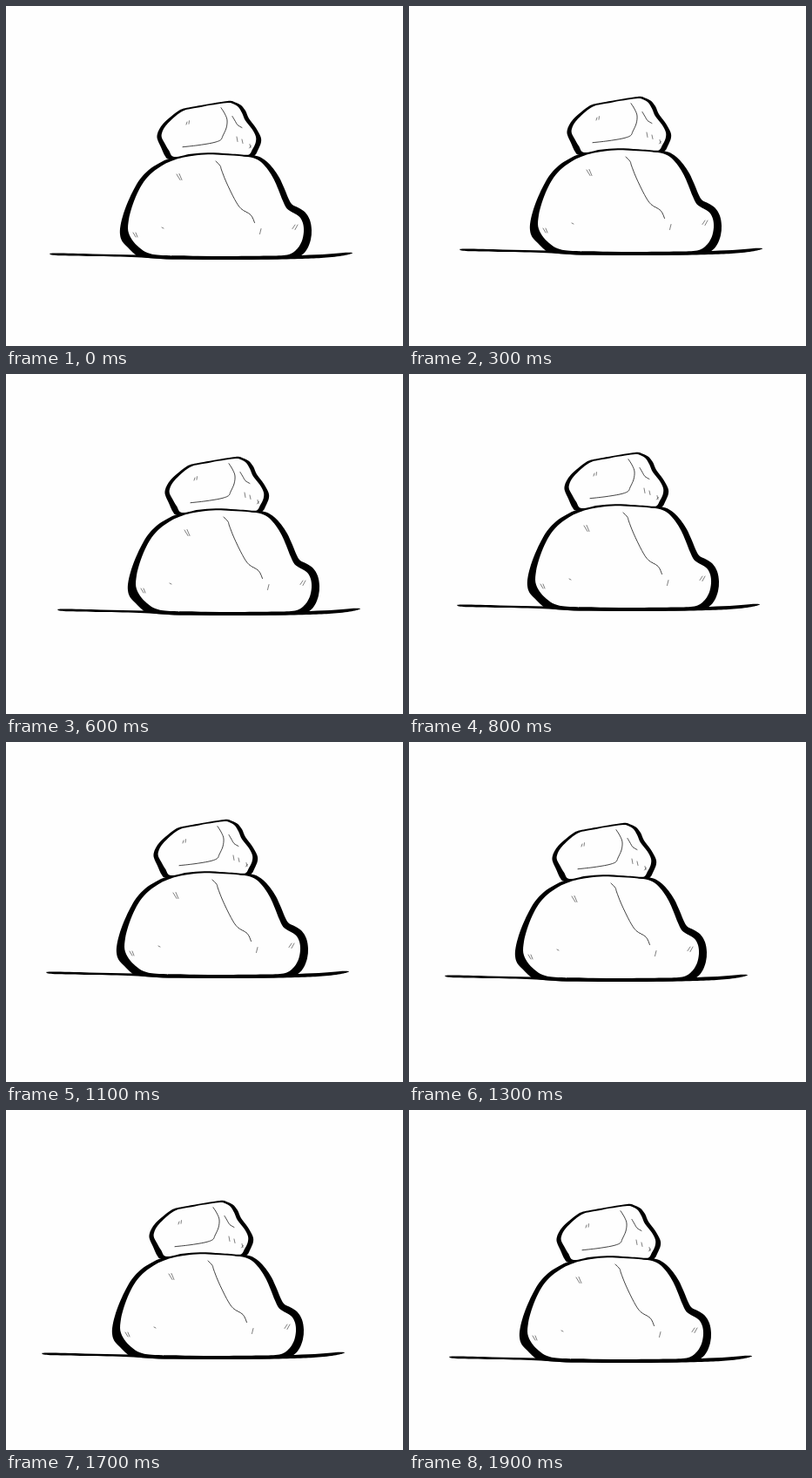
An HTML page that plays this animation: 456 px wide and 390 px high, repeating every 2000 ms.

```html
<!DOCTYPE html>
<html lang="en">
<head>
<meta charset="utf-8">
<title>Stacked stones</title>
<style>
  html, body { margin: 0; width: 100%; height: 100%; overflow: hidden; background: #fefefe; }
  svg { display: block; width: 456px; height: 390px; }
  .ink { fill: #000; }
  .face { fill: #fefefe; }
  .crack { fill: none; stroke: #222; stroke-width: .85; stroke-linecap: round; }
  .tick { fill: none; stroke: #555; stroke-width: .75; stroke-linecap: round; }
</style>
</head>
<body>
<svg viewBox="0 0 456 390">
  <g id="stones">
    <!-- ground -->
    <path class="ink" data-closed data-points="51,285 56,283.6 100,284.4 150,285.4 200,287 250,287.4 300,287 340,286 370,284.6 392,282.8 398,283.6 388,286.2 365,288.8 340,290 300,290.8 240,291 190,290.6 150,288.2 100,287 60,286.2"/>
    <!-- large stone -->
    <path class="ink" data-closed data-points="188,174.8 176,180.2 164,188 154,198.5 147,210 140.5,223.5 135,238 131.5,252 131,262 133.5,270 140,277 148,284.7 156,288 185,290.2 240,290.6 300,290.4 331,288.5 340,285.5 346,278.5 350,268 351,257 349,245.5 343.5,236.5 336,231.5 329,228 325,222 320,210 314,197 307,186.5 299,178 289,172.3 275,170.2 250,169.3 232,168.6 215,170 200,172.3"/>
    <path class="face" data-closed data-points="193,176.8 181,182 168,191 158,202 150.5,215.5 144.5,231 141,245 140.3,258 145,268.5 153,277 163,283.2 180,286 220,286.7 260,286.9 300,286.5 323,285.4 333,280 339.5,270.5 342,259 341,249 337,241.8 330,237.3 322.5,232.2 318,223.5 313,211 307.5,198.5 301,188 293,179 284,174.2 270,172.2 250,171 232,170.2 215,171.7 203,173.8"/>
    <path class="crack" data-points="241,178 246,183.3 247.5,188 253,202 262.5,221.5 270,232.5 281,239.5 285.5,248.5"/>
    <!-- small stone -->
    <path class="ink" data-closed data-points="188,175.2 183,172.5 178,162 174,153 173.7,147.5 176,141.5 180.5,135 188,128 197,121 204,117.6 212,115.9 225,113.7 242,110.8 255,108.9 262,109.9 269.5,113.5 275,120 279,129 287,139.7 292.5,150 292.8,157 289.5,165 286.5,170.5 281,173 262,171 232,169.6 212,171.6"/>
    <path class="face" data-closed data-points="193,173 187,165.5 182,157 178.8,150.5 179.3,145 183,138 190,130.5 199,123 206,119.3 213,117.8 226,115.4 243,112.6 255,111 261,112.2 267,116 271,122.5 275,131.5 282.5,141 287,150 286.5,157.5 283,164.5 280,169.7 275,170.7 255,169.2 232,168.2 212,169.7"/>
    <path class="crack" data-points="247,116.7 251.5,124 254,131 253,140 249,149 246.3,153.8 237,157 220,159.8 203,161.7"/>
    <path class="crack" data-points="260,126.5 263.5,132.5 266,136.5 271,139.5"/>
    <path class="tick" d="M208 133l-1 3M210.500 131.700l-.5 3.500M265 150l1 5.500M271 153l1 4.500M280 158.500l1 4M281.500 160.500l-2 2.500"/>
    <path class="tick" d="M196 193l4 6.500M199 192.500l3 7M179 254l2 1M146 260l3 5M149 260l2 5M293 255.500l-1.500 6M332 251l-3 4.500M335 251l-3 5.500"/>
  </g>
</svg>
<script>
  const LOOP = 2000, STEPS = 20, RADIUS = 10;
  const stones = document.getElementById('stones');

  // Smooth curve through the points (Catmull-Rom as cubic Béziers)
  function smooth(points, closed) {
    const n = points.length;
    const at = i => points[closed ? (i + n) % n : Math.max(0, Math.min(n - 1, i))];
    let d = 'M' + points[0];
    for (let i = 0; i < (closed ? n : n - 1); i++) {
      const [a, b, c, e] = [at(i - 1), at(i), at(i + 1), at(i + 2)];
      const out = b.map((v, k) => v + (c[k] - a[k]) / 6);
      const into = c.map((v, k) => v - (e[k] - b[k]) / 6);
      d += `C${out} ${into} ${c}`;
    }
    return d + (closed ? 'Z' : '');
  }

  for (const path of document.querySelectorAll('[data-points]')) {
    const points = path.dataset.points.split(' ').map(p => p.split(',').map(Number));
    path.setAttribute('d', smooth(points, 'closed' in path.dataset));
  }

  // The drawing circles in whole pixels, one step every 100 ms
  function draw(now) {
    const step = Math.floor((now % LOOP) / LOOP * STEPS);
    const angle = step * 2 * Math.PI / STEPS;
    const x = Math.floor(RADIUS * Math.sin(angle));
    const y = Math.floor(RADIUS * Math.cos(angle) - RADIUS);
    stones.setAttribute('transform', `translate(${x} ${y})`);
  }

  const start = performance.now();
  function tick() {
    draw(performance.now() - start);
    requestAnimationFrame(tick);
  }
  tick();
</script>
</body>
</html>
```
